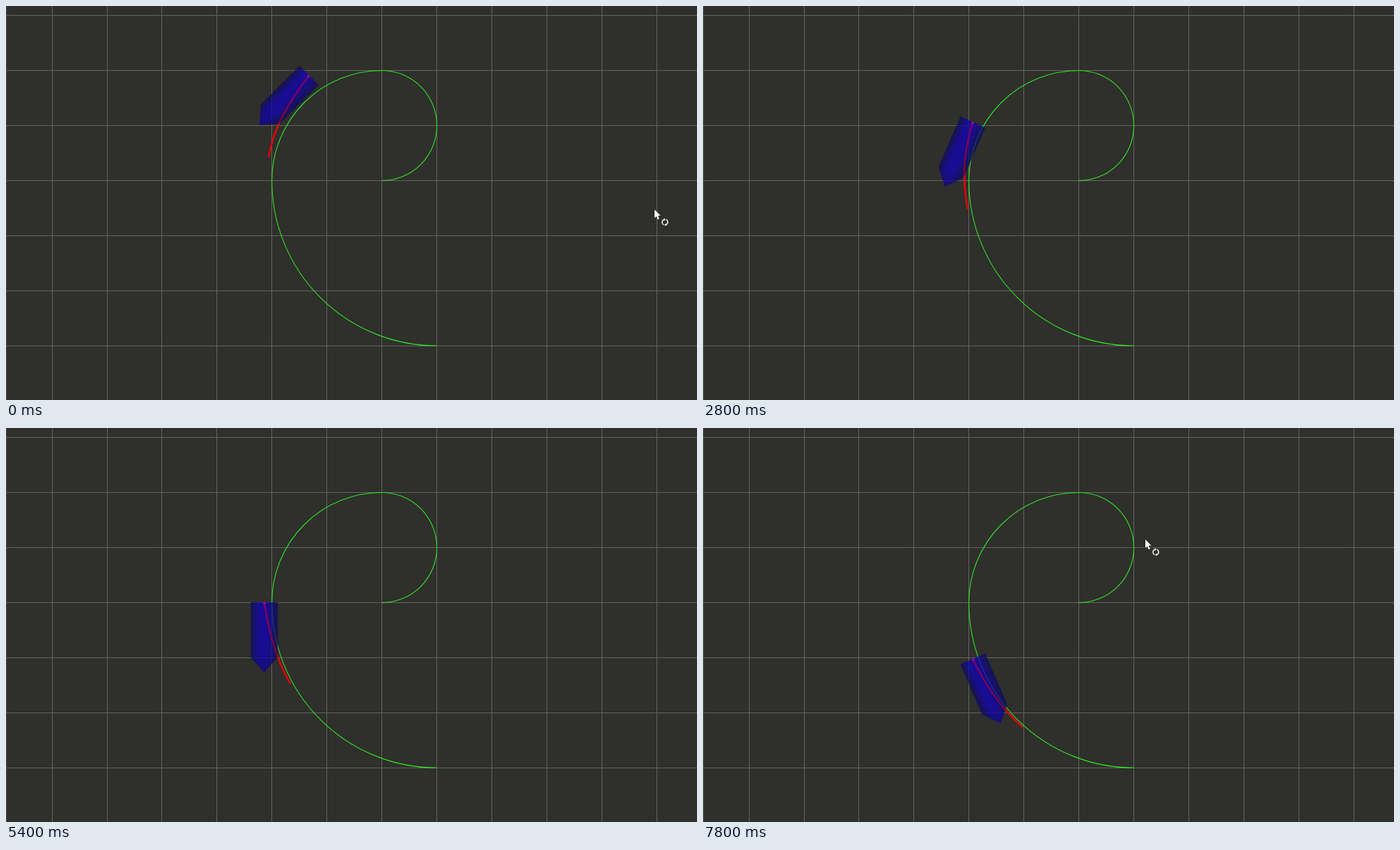
Write an HTML page with a canvas that moves like this. It is 992 px wide and 565 px high and loops after 8 s.

```html
<!DOCTYPE html>
<html lang="en">
<head>
<meta charset="utf-8">
<title>Path following</title>
<style>
  html, body { margin: 0; width: 100%; height: 100%; overflow: hidden; background: #2f2f2b; }
  canvas { display: block; }
</style>
</head>
<body>
<canvas id="stage" width="992" height="565"></canvas>
<script>
const ctx = document.getElementById('stage').getContext('2d');
const LOOP = 8, STEP = .2, CELL = 78.95;
const RAD = Math.PI / 180;

// Grid coordinates to pixels; the origin is where the two large arcs meet.
const gridX = n => 381.7 + CELL * n;
const gridY = n => 250.4 + CELL * n;

// seconds, distance travelled along the track
const TRAVEL = [[0, 0], [1.8, 45.2], [2.8, 72.8], [5.4, 152], [7, 210.8], [7.8, 232]];
// seconds, tip x, tip y
const POINTER = [[6, 524, 83], [7, 537, 122.5], [7.2, 585, 161], [7.8, 635, 160]];

function interpolate(keys, t) {
  let i = 0;
  while (i < keys.length - 2 && t >= keys[i + 1][0]) i++;
  const [t0, ...from] = keys[i], [t1, ...to] = keys[i + 1];
  return from.map((v, k) => v + (to[k] - v) * (t - t0) / (t1 - t0));
}

// Point beside the track: s runs from the arc joint, offset points outwards.
function besideTrack(s, offset) {
  const cells = s < 0 ? 2 : 3;
  const radius = CELL * cells, angle = s / radius;
  return [
    gridX(cells) - (radius + offset) * Math.cos(angle),
    gridY(0) + (radius + offset) * Math.sin(angle)
  ];
}

function trace(points) {
  ctx.beginPath();
  points.forEach(([x, y]) => ctx.lineTo(x, y));
}

function fillShape(points, style) {
  trace(points);
  ctx.closePath();
  ctx.fillStyle = style;
  ctx.fill();
}

function gradient(x, y, stops) {
  const result = ctx.createLinearGradient(0, -y, x, y);
  stops.forEach(([at, color]) => result.addColorStop(at, color));
  return result;
}

function drawGrid() {
  ctx.fillStyle = '#2f2f2b';
  ctx.fillRect(0, 0, 992, 565);
  ctx.fillStyle = '#646461';
  for (let n = -4; n <= 7; n++) ctx.fillRect(Math.floor(gridX(n) + .2), 0, 1, 565);
  for (let n = -3; n <= 3; n++) ctx.fillRect(0, Math.floor(gridY(n)), 992, 1);
  ctx.fillStyle = '#50504d';
  ctx.fillRect(0, 0, 1, 565);
}

function drawTrack() {
  const quarter = Math.PI / 2;
  ctx.beginPath();
  ctx.arc(gridX(2), gridY(-1), CELL, quarter, -quarter, true);
  ctx.arc(gridX(2), gridY(0), CELL * 2, -quarter, -2 * quarter, true);
  ctx.arc(gridX(3), gridY(0), CELL * 3, 2 * quarter, quarter, true);
  ctx.strokeStyle = '#30e62a';
  ctx.lineWidth = 1.1;
  ctx.stroke();
}

function drawBody(x, y, heading) {
  ctx.save();
  ctx.translate(x, y);
  ctx.rotate(heading);
  const outline = [[0, -19.5], [79, -19.5], [100.7, 0], [79, 19.5], [0, 19.5]];
  fillShape(outline, gradient(0, 19.5, [
    [0, 'rgba(12, 10, 90, .72)'],
    [.4, 'rgba(16, 0, 182, .74)'],
    [.7, 'rgba(16, 0, 182, .74)'],
    [1, 'rgba(12, 10, 85, .72)']
  ]));
  fillShape(outline, gradient(101, 0, [
    [.72, 'rgba(18, 18, 50, 0)'],
    [1, 'rgba(18, 18, 50, .35)']
  ]));
  ctx.fillStyle = '#a010b0';
  ctx.fillRect(0, -1.5, 3, 3);
  ctx.restore();
}

// The vehicle closes in on the track; its planned path does so faster.
function drawVehicle(t) {
  const [travelled] = interpolate(TRAVEL, t);
  const s = travelled - 152.5;
  const offset = 4 + 21.6 * Math.exp(-t / 4.7);
  const heading = (135 - .295 * travelled) * RAD;
  const plan = [];
  for (let ahead = 0; ahead <= 120; ahead += 4) {
    plan.push(besideTrack(s + ahead, offset * (.25 + .75 * Math.exp(-ahead / 50))));
  }
  const strokePlan = (color, width) => {
    trace(plan);
    ctx.strokeStyle = color;
    ctx.lineWidth = width;
    ctx.stroke();
  };
  strokePlan('#e60008', 2.5);
  drawBody(...plan[0], heading);
  strokePlan('rgba(230, 0, 8, .38)', 2);
}

function pointerAt(t) {
  if (t < 1.6) return t < 1.4 ? [931, 292] : [936, 295.5];
  return t < 6 ? null : interpolate(POINTER, t);
}

function drawPointer(t) {
  const tip = pointerAt(t);
  if (!tip) return;
  ctx.save();
  ctx.translate(...tip);
  const arrow = [[0, 0], [0, 12], [2.7, 9.6], [4.8, 14.2], [6.8, 13.3], [4.8, 8.8], [8.6, 8.6]];
  fillShape(arrow, '#fff');
  ctx.strokeStyle = '#1c1c1a';
  ctx.lineWidth = 1;
  ctx.stroke();
  fillShape(arrow, '#fff');

  // Two half circles with arrowheads
  ctx.translate(15, 18);
  for (let side = 0; side < 2; side++) {
    ctx.beginPath();
    ctx.arc(0, 0, 4, -1.15, 1.4);
    ctx.strokeStyle = '#f4f4f4';
    ctx.lineWidth = 1.6;
    ctx.stroke();
    fillShape([[1.5, 1.8], [1.5, 5.8], [-1, 4]], '#f4f4f4');
    ctx.rotate(Math.PI);
  }
  ctx.restore();
}

const start = performance.now();
function frame() {
  const elapsed = (performance.now() - start) / 1000 % LOOP;
  const t = Math.floor(elapsed / STEP) * STEP + 1e-6;
  drawGrid();
  drawTrack();
  drawVehicle(t);
  drawPointer(t);
  requestAnimationFrame(frame);
}
frame();
</script>
</body>
</html>
```
